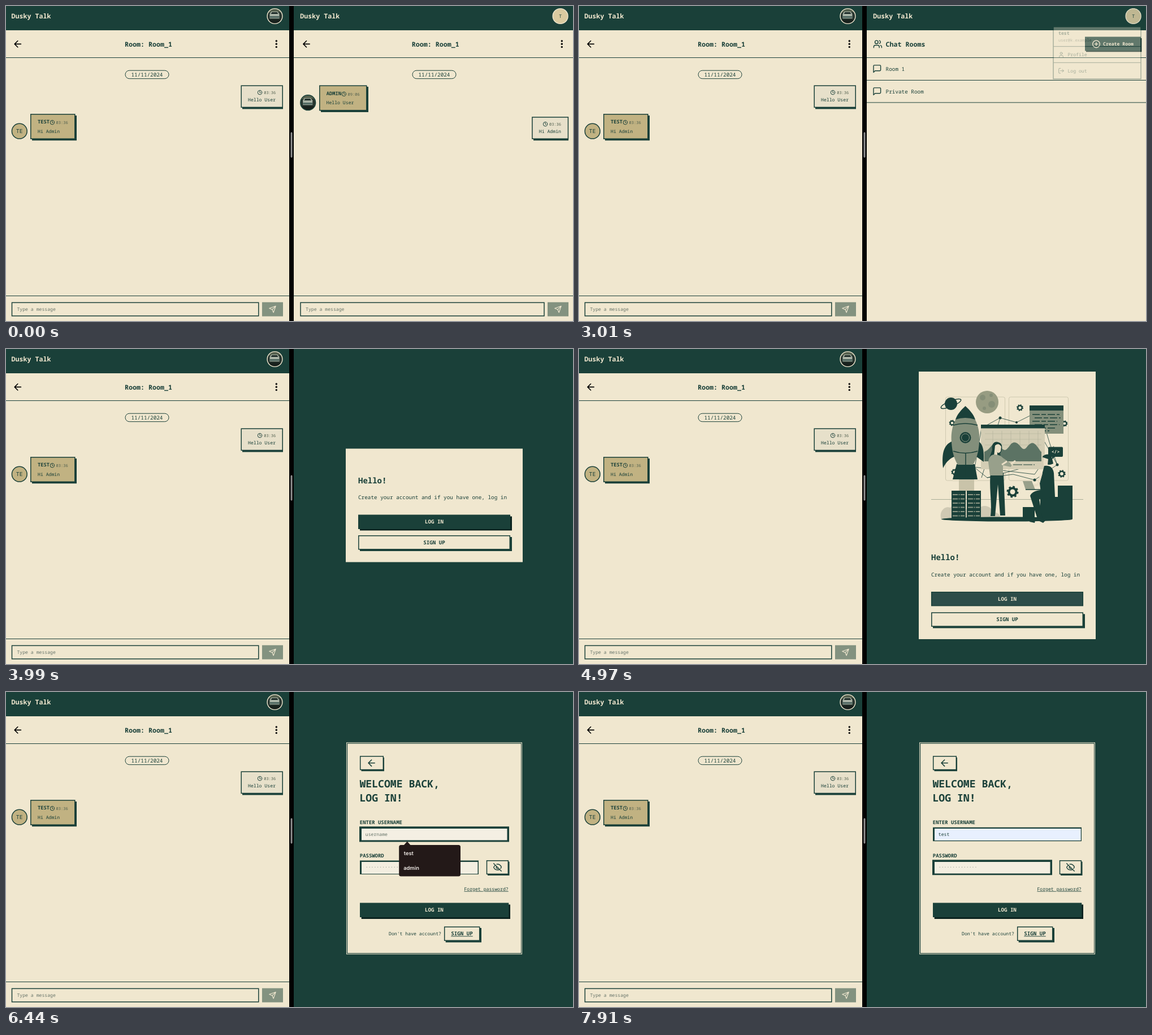
Animation of 1003 by 558 pixels, one loop 8 s. Source, as an HTML page:

```html
<!DOCTYPE html>
<html lang="en">
<head>
<meta charset="utf-8">
<title>Chat demo</title>
<style>
  html, body { margin: 0; width: 100%; height: 100%; overflow: hidden; background: #000; }
  svg { display: block; }
  #stage { width: 100%; height: 100%; --dark: #1a4039; --cream: #f0e7cf; --tan: #c1b282; --deep: #0b231f; --mid: #838f7b; }
  text { font-family: "Noto Sans Mono", "DejaVu Sans Mono", monospace; font-size: 8.17px; fill: var(--dark); text-rendering: geometricPrecision; white-space: pre; }
  .xs { font-size: 7px; fill: #52604f; }
  .md { font-size: 9.33px; }
  .lg { font-size: 11.67px; font-weight: 700; }
  .xl { font-size: 14px; font-weight: 700; }
  .xxl { font-size: 18.17px; font-weight: 700; }
  .name { font-size: 8.75px; font-weight: 700; }
  .label { font-size: 8.95px; font-weight: 600; }
  .btn { font-size: 9.17px; font-weight: 600; }
  .b { font-weight: 600; }
  .c { text-anchor: middle; }
  .light { fill: var(--cream); }
  .hint { fill: #68756a; }
  .u { text-decoration: underline; }
  .tip { font: 600 9.3px Inter, "Liberation Sans", sans-serif; fill: #f3eee9; }
  .dark { fill: var(--dark); }
  .cream { fill: var(--cream); }
  .tan { fill: var(--tan); }
  .mid { fill: var(--mid); }
  .deep { fill: var(--deep); }
  .edge { stroke: var(--dark); stroke-width: 1.5; }
  .line { stroke: var(--dark); stroke-width: 1; fill: none; }
  .icon { fill: none; stroke: var(--dark); stroke-width: 2; stroke-linecap: round; stroke-linejoin: round; }
  .black { stroke: #000; }
  .pale { stroke: var(--cream); }
  [data-on] { opacity: 0; }
</style>
</head>
<body>
<svg id="stage" viewBox="0 0 1003 558" preserveAspectRatio="none">
  <defs>
    <clipPath id="round"><circle r="13"/></clipPath>
    <g id="photo">
      <g clip-path="url(#round)">
        <rect x="-14" y="-14" width="28" height="28" fill="#27352f"/>
        <path d="M-14-14H14V-6L4-8-4-5-14-7Z" fill="#56614f"/>
        <path d="M-9-4 -6-8H5L8-4V4H-9Z" fill="#a9b3a6"/>
        <path d="M-7-4 -5-7H4L6-4Z" fill="#1b2926"/>
        <path d="M-9 0H8V3H-9Z" fill="#4d665f"/>
        <path d="M-14 6H14V14H-14Z" fill="#18211d"/>
      </g>
    </g>
    <g id="back"><path d="M12 19l-7-7 7-7M19 12H5"/></g>
    <g id="dots"><circle r="1.7" cy="-5.3"/><circle r="1.7"/><circle r="1.7" cy="5.3"/></g>
    <g id="clock" class="icon" stroke-width="1"><path style="stroke-width:1" d="M3.7 0A3.7 3.7 0 1 1-3.7 0 3.7 3.7 0 1 1 3.7 0M0-2.2V0L1.5.8"/></g>
    <g id="send">
      <rect width="37" height="25" fill="#839280"/>
      <path class="icon pale" transform="translate(11.6 5.7) scale(.57)" d="M22 2L11 13M22 2l-7 20-4-9-9-4Z"/>
    </g>
    <g id="room"><path class="icon" transform="scale(.7)" d="M21 15a2 2 0 0 1-2 2H7l-4 4V5a2 2 0 0 1 2-2h14a2 2 0 0 1 2 2z"/></g>
    <g id="pill">
      <rect class="line" x=".5" y=".5" width="77" height="14.5" rx="7.25"/>
      <text class="md c" x="39" y="11.2">11/11/2024</text>
    </g>
    <g id="gear" fill="none" stroke="#1a4039">
      <circle r="6.5" stroke-width="4"/>
      <circle r="9" stroke-width="3" stroke-dasharray="3.5 3.57"/>
    </g>
    <g id="rack">
      <rect class="dark" width="25" height="50"/>
      <path d="M2 7H23M2 14.5H23M2 22H23M2 29.5H23M2 37H23M2 44.5H23" stroke="#8a9583" stroke-width="2" stroke-dasharray="9 1.5 2 1.5"/>
    </g>
    <g id="pressed">
      <rect class="cream" width="272" height="29"/>
      <rect x=".7" y=".7" width="267.6" height="24" class="edge" fill="#2d4d49"/>
    </g>
  </defs>

  <!-- left window -->
  <rect class="cream" width="501" height="558"/>
  <rect class="dark" width="501" height="43"/>
  <text class="lg light" x="9.6" y="22.4">Dusky Talk</text>
  <use href="#photo" x="475.5" y="18"/>
  <circle cx="475.5" cy="18" r="13.4" fill="none" stroke="#f0e7cf" stroke-width="1.4"/>
  <use href="#back" class="icon black" transform="translate(11.2 57.8) scale(.8)"/>
  <text class="lg" x="210" y="71.6">Room: Room_1</text>
  <use href="#dots" x="478.3" y="67.3"/>
  <path class="line" d="M0 91.5H501M0 513.5H501"/>
  <use href="#pill" x="210.5" y="113.7"/>
  <path class="dark" d="M418 143H490V182.5H418Z"/>
  <rect class="edge" x="416.2" y="141.2" width="73" height="38.2" fill="#e7e0ca"/>
  <use href="#clock" x="449" y="153.2"/>
  <text class="xs" x="456.2" y="156">03:36</text>
  <text x="428" y="168.8">Hello User</text>
  <circle class="edge tan" cx="23.8" cy="221.7" r="13.4"/>
  <text class="c" style="font-size:9.8px" x="23.7" y="225.2">TE</text>
  <path class="dark" d="M46 194H125V238.3H46Z"/>
  <rect class="edge tan" x="43.8" y="191.8" width="78" height="43.4"/>
  <text class="name" x="56" y="208.4">TEST</text>
  <use href="#clock" x="81.8" y="206.2"/>
  <text class="xs" x="88.6" y="209">03:36</text>
  <text x="56" y="224.8">Hi Admin</text>
  <rect class="edge" x="10.5" y="525.4" width="436.3" height="23.6" fill="none"/>
  <text class="hint" x="19.4" y="540.4">Type a message</text>
  <use href="#send" x="453" y="524.7"/>

  <!-- divider -->
  <rect x="501" width="8" height="558"/>
  <rect x="503.5" y="223.5" width="3" height="45" rx="1.5" fill="#8e8e8e"/>

  <!-- right window: room -->
  <rect class="cream" x="509" width="494" height="558"/>
  <rect class="dark" x="509" width="494" height="43"/>
  <text class="lg light" x="520.2" y="22.4">Dusky Talk</text>
  <circle cx="980.6" cy="18" r="13.4" fill="#d9caa0" stroke="#f0e7cf" stroke-width="1.4"/>
  <text class="c" x="980.6" y="21">T</text>
  <use href="#back" class="icon black" transform="translate(521.9 57.8) scale(.8)"/>
  <use href="#back" class="icon" transform="translate(521.9 57.8) scale(.8)" data-on="840 1890 210"/>
  <text class="lg" x="717.8" y="71.6">Room: Room_1</text>
  <use href="#dots" x="983.3" y="67.3"/>
  <path class="line" d="M509 91.5H1003M509 513.5H1003"/>
  <use href="#pill" x="718.5" y="113.7"/>
  <use href="#photo" x="534.2" y="171.2"/>
  <circle class="edge" cx="534.2" cy="171.2" r="13.4" fill="none"/>
  <path class="dark" d="M557 143H641V188H557Z"/>
  <rect class="edge tan" x="554.8" y="141.2" width="83" height="43.6"/>
  <text class="name" x="566.8" y="158">ADMIN</text>
  <use href="#clock" x="597.8" y="155.9"/>
  <text class="xs" x="604.6" y="158.8">09:06</text>
  <text x="566.5" y="174.4">Hello User</text>
  <path class="dark" d="M933 199H995V238.3H933Z"/>
  <rect class="edge" x="930.9" y="197" width="63.5" height="38.2" fill="#e7e0ca"/>
  <use href="#clock" x="954" y="209.2"/>
  <text class="xs" x="961" y="212">03:36</text>
  <text x="942.8" y="224.8">Hi Admin</text>
  <rect class="edge" x="521" y="525.4" width="431" height="23.6" fill="none"/>
  <text class="hint" x="530" y="540.4">Type a message</text>
  <use href="#send" x="958" y="524.7"/>

  <!-- right window: room list -->
  <g data-on="1890 3990">
    <rect class="cream" x="509" y="43" width="494" height="515"/>
    <path class="line" d="M509 91.5H1003M509 131.5H1003M509 171H1003"/>
    <g class="icon" transform="translate(520 59) scale(.7)">
      <path d="M16 21v-2a4 4 0 0 0-4-4H6a4 4 0 0 0-4 4v2M22 21v-2a4 4 0 0 0-3-3.87M16 3.13a4 4 0 0 1 0 7.75"/>
      <circle cx="9" cy="7" r="4"/>
    </g>
    <text class="lg" x="542.5" y="71.6">Chat Rooms</text>
    <path class="deep" d="M897 57H995.3V81.3H897Z"/>
    <rect class="dark" x="895" y="54.5" width="98.7" height="25"/>
    <g class="icon pale" transform="translate(906.6 59) scale(.7)">
      <path d="M12 8v8M8 12h8"/><circle cx="12" cy="12" r="9"/>
    </g>
    <text class="b light" x="927" y="70.4">Create Room</text>
    <use href="#room" x="518.9" y="102.8"/>
    <text class="md" x="542.6" y="114.7">Room 1</text>
    <use href="#room" x="518.9" y="142.8"/>
    <text class="md" x="542.6" y="154.7">Private Room</text>
  </g>
  <path d="M533 68.5V78.6L535.2 76.6 536.9 80.4 538.6 79.7 537 76H540Z" stroke="#fff" stroke-width=".5" data-on="1890 2240"/>
  <g data-on="2730 3150 210 210"><circle class="dark" cx="980.6" cy="18" r="13.4" opacity=".2"/></g>
  <g data-on="3010 3990 210">
    <rect class="edge cream" x="839" y="36.8" width="155" height="92.4"/>
    <path class="line" d="M839 71.7H994M839 100.3H994"/>
    <path d="M841.5 75H991.5V98H841.5Z" fill="#f3f1f1" data-on="3500 3710 140 140"/>
    <path d="M841.5 103.3H991.5V126.6H841.5Z" fill="#f3f1f1" data-on="3640 3990 210"/>
    <text class="b" x="848" y="51.4">test</text>
    <text class="xs hint" x="848" y="62.8">user@k.example</text>
    <g class="icon" transform="translate(847.3 80.5) scale(.48)">
      <path d="M19 21v-2a4 4 0 0 0-4-4H9a4 4 0 0 0-4 4v2"/><circle cx="12" cy="7" r="4"/>
    </g>
    <text x="864.4" y="89.2">Profile</text>
    <path class="icon" transform="translate(847.3 109) scale(.48)" d="M9 21H5a2 2 0 0 1-2-2V5a2 2 0 0 1 2-2h4M16 17l5-5-5-5M21 12H9"/>
    <text x="864.4" y="117.8">Log out</text>
  </g>

  <!-- right window: welcome -->
  <rect class="dark" x="509" width="494" height="558" data-on="3990 8000"/>
  <path class="cream" d="M601 176.5H914V377.5H601Z" data-on="3990 4060"/>
  <g data-on="4060 5250">
    <path class="cream" d="M601 40H914V514H601Z"/>
    <g fill="none" stroke="#cfc9b0">
      <rect x="648.5" y="85" width="105" height="148" rx="3"/>
      <rect x="760.5" y="85" width="105" height="148" rx="3"/>
      <path d="M623 266.5H892" stroke="#a9ae98"/>
    </g>
    <g fill="none" stroke="#1a4039" stroke-width=".8">
      <path d="M712 140L745 122 774 130 798 118 824 138 832 165 846 205 806 232 768 222 722 228 700 210 712 140M690 208L806 222 840 172M745 122L712 228M798 118L846 205M722 228L824 200"/>
    </g>
    <g class="dark">
      <circle cx="658" cy="97" r="11"/><circle cx="745" cy="122" r="2.5"/><circle cx="774" cy="130" r="2"/><circle cx="846" cy="205" r="2.5"/><circle cx="806" cy="232" r="2.5"/>
    </g>
    <ellipse cx="658" cy="97" rx="19" ry="5" transform="rotate(-22 658 97)" class="edge" fill="none"/>
    <circle cx="722" cy="94" r="20" fill="#979c82"/>
    <g fill="#858e77"><circle cx="714" cy="86" r="5"/><circle cx="730" cy="98" r="6"/><circle cx="717" cy="105" r="3"/><circle cx="729" cy="82" r="3"/></g>
    <use href="#gear" transform="translate(780 104) scale(.57)"/>
    <use href="#gear" transform="translate(660 131) scale(.52)"/>
    <use href="#gear" transform="translate(664 218) scale(.55)"/>
    <use href="#gear" transform="translate(854 221) scale(.65)"/>
    <use href="#gear" transform="translate(859 132) scale(.52)"/>
    <use href="#gear" transform="translate(767 253)"/>
    <!-- windows -->
    <path class="mid" d="M797 100H857V150H797Z"/>
    <path class="dark" d="M797 100H857V109H797Z"/>
    <path d="M802 116H850M806 122H852M802 128H846M806 134H850M802 140H842M802 145H832" class="edge" stroke-dasharray="13 3 8 3"/>
    <path d="M711 139H824V213H711Z" fill="#d3cdb4"/>
    <path class="dark" d="M711 134H824V140.5H711Z"/>
    <path d="M718 150H818M718 160H818M718 170H818M718 180H818M732 145V200M748 145V200M764 145V200M780 145V200M796 145V200M812 145V200" stroke="#b7b69f" stroke-width=".7"/>
    <path d="M717 199V182C726 180 730 166 738 168S750 184 757 177 765 164 773 166 784 184 792 174 804 165 810 172 815 181 818 182V199Z" fill="#5c7364"/>
    <path d="M768 205H806" stroke="#1a4039" stroke-dasharray="16 2"/>
    <path class="dark" d="M832 173.5H854Q856 173.5 856 175.5V189Q856 191 854 191H842L837 195V191H832Q830 191 830 189V175.5Q830 173.5 832 173.5Z"/>
    <text class="b light c" x="843" y="185.3">&lt;/&gt;</text>
    <!-- rocket -->
    <path d="M672 228H699V252H672Z" fill="#c9c3a9"/>
    <path class="dark" d="M661 163C646 169 641 183 644 211 650 199 657 193 666 190ZM706 163C714 168 717 178 716 200L702 190ZM668 204H700L705 231H661Z"/>
    <path class="mid" d="M683.5 102C665 120 657 140 659 165 660 184 665 197 670 205H697C702 197 707 184 708 165 710 140 702 120 683.5 102Z"/>
    <path class="dark" d="M683.5 101C675 109 669 116 666 125Q683 119 701 125C698 116 692 109 683.5 101Z"/>
    <path class="edge" fill="none" d="M662 135Q683 129 705 135M662 181Q683 188 705 181M684 185V224"/>
    <circle class="dark" cx="683.5" cy="157" r="10"/>
    <circle cx="683.5" cy="157" r="7" fill="none" stroke="#8a9583"/>
    <!-- ground -->
    <path d="M641 302C636 289 646 277 657 281 667 270 677 276 679 283H706C717 273 731 280 731 289 742 288 746 295 745 302Z" fill="#cfc9b3"/>
    <use href="#rack" x="659" y="251"/>
    <use href="#rack" x="686" y="251"/>
    <ellipse class="dark" cx="757" cy="301.5" rx="116" ry="4"/>
    <path class="dark" d="M847 242H873V301H847ZM816 262H848V301H816ZM785 280H806V301H785Z"/>
    <!-- people -->
    <path class="dark" d="M731 178C729 166 737 162 744 166 751 169 748 181 745 185 748 194 735 204 728 199 723 195 729 187 731 178ZM728 219H751L754 295H745L741 240 736 296H728C731 273 725 246 728 219Z"/>
    <path d="M736 171Q742 165 747 173L746 181Q743 186 740 183V190H734Z" fill="#e9dec5"/>
    <path d="M733 187Q744 186 750 193L766 204 764 209 750 206V224H727L724 200Q725 189 733 187Z" fill="#98a08b"/>
    <path d="M764 204L772 198M748 205L757 199" stroke="#e9dec5" stroke-width="3"/>
    <path class="dark" d="M820 190Q828 183 836 190L839 203Q830 208 823 201ZM823 207Q838 205 840 220L842 262H818L815 238ZM838 246L842 263 814 266 820 301H811L798 260Q802 251 816 250ZM816 297 826 303 821 308 810 303ZM798 300H808L806 308 797 306Z"/>
    <path d="M821 192 830 195 829 205 822 207Z" fill="#e9dec5"/>
    <path d="M818 220 812 240 802 243" fill="none" stroke="#e9dec5" stroke-width="4"/>
    <path d="M785 234H801L807 249H790Z" fill="#98a08b"/>
    <path d="M790 249H820" class="edge"/>
  </g>
  <g data-on="3990 5250">
    <g id="intro">
      <text class="xl" x="623" y="374.3">Hello!</text>
      <text class="md" x="623" y="402.6">Create your account and if you have one, log in</text>
      <path class="deep" d="M626 433H895V458H626Z"/>
      <path class="dark" d="M623 430H892V455.3H623Z"/>
      <use href="#pressed" x="623" y="430" data-on="4900 5250 140"/>
      <text class="btn light c" x="757.5" y="445.9">LOG IN</text>
      <path class="dark" d="M626 469.5H895V494.5H626Z"/>
      <rect class="edge cream" x="623.8" y="467.2" width="267.5" height="24"/>
      <text class="btn c" x="757.5" y="482.2">SIGN UP</text>
    </g>
  </g>

  <!-- right window: log in -->
  <g data-on="5250 8000">
    <rect x="602.5" y="89.8" width="310" height="374.4" fill="none" stroke="#f0e7cf"/>
    <path class="cream" d="M604.2 91.5H911V462.5H604.2Z"/>
    <path class="dark" d="M628.5 116H669V140.3H628.5Z"/>
    <rect class="edge cream" x="626.7" y="114" width="40.6" height="23.6"/>
    <use href="#back" class="icon" transform="translate(637 116.2) scale(.8)"/>
    <text class="xxl" x="625.4" y="169">WELCOME BACK,</text>
    <text class="xxl" x="625.4" y="194.4">LOG IN!</text>
    <text class="label" x="625.8" y="234.4">ENTER USERNAME</text>
    <path class="dark" d="M626 239.7H889V264.3H626Z"/>
    <path d="M629 242H887.5V263H629Z" fill="#f4efe3"/>
    <path d="M629 242H887.5V263H629Z" fill="#e8f0fe" data-on="6510 8000 210"/>
    <path class="dark" fill-rule="evenodd" d="M625 238.2H890V265.5H625ZM628 240.6V262.5H886.5V240.6Z" data-on="5880 7560 280 280"/>
    <text class="hint" x="635.8" y="255" data-on="5250 6580">username</text>
    <text x="635.8" y="255" data-on="6580 8000">test</text>
    <text class="label" x="625.8" y="292.8">PASSWORD</text>
    <path class="dark" d="M626 298.4H836V323H626Z"/>
    <path d="M629 301H834.5V322H629Z" fill="#f3eee0"/>
    <path class="dark" fill-rule="evenodd" d="M625 297.2H837V324.2H625ZM628 299.6V321.4H833.5V299.6Z" data-on="7350 8000 280"/>
    <text class="hint" x="635.8" y="313.4">··············</text>
    <path d="M636.2 305.2V316" class="line" data-on="7420 7910"/>
    <path class="dark" d="M852 300.5H890.5V325H852Z"/>
    <rect class="edge cream" x="850.5" y="298.8" width="37.8" height="23.6"/>
    <path class="icon" transform="translate(861.3 302.3) scale(.68)" d="M9.9 4.2A10 10 0 0 1 22 12a17 17 0 0 1-2.2 3.2M6.6 6.6A13.5 13.5 0 0 0 2 12s3 7 10 7a9.7 9.7 0 0 0 5.4-1.6M14.1 14.1a3 3 0 1 1-4.2-4.2M2 2L22 22"/>
    <text class="u" x="810.4" y="351.8">Forget password?</text>
    <path class="deep" d="M628.7 376.5H892V402H628.7Z"/>
    <path class="dark" d="M626 373.6H889.3V399H626Z"/>
    <g data-on="5250 5530 0 210">
      <path class="cream" d="M626 373H893V403H626Z"/>
      <rect class="edge" x="626.7" y="374.4" width="262" height="24" fill="#2d4d49"/>
    </g>
    <text class="btn light c" x="757.4" y="389.3">LOG IN</text>
    <text x="677" y="431.2">Don't have account?</text>
    <path class="dark" d="M777.7 418H841V443.4H777.7Z"/>
    <rect class="edge cream" x="775.7" y="416.2" width="62" height="24"/>
    <text class="btn c u" x="806.5" y="431.3">SIGN UP</text>
    <g data-on="5880 7000 280 140">
      <path d="M704 271L709.7 264.8 715.4 271H800.5Q804 271 804 274.5V323Q804 326.5 800.5 326.5H698.7Q695.2 326.5 695.2 323V274.5Q695.2 271 698.7 271Z" fill="#231918"/>
      <rect x="698" y="275" width="103.5" height="23" rx="3" fill="#433a39" data-on="6510 7000 140"/>
      <text class="tip" x="703.7" y="289.4">test</text>
      <text class="tip" x="703.2" y="314.6">admin</text>
    </g>
  </g>
</svg>
<script>
  const LOOP = 8000, TICK = 70;
  // data-on: start, end, fade-in and fade-out lengths in ms
  const parts = [...document.querySelectorAll('[data-on]')].map(el => {
    const [from, to, fadeIn = 0, fadeOut = 0] = el.dataset.on.split(' ').map(Number);
    return { el, from, to, fadeIn, fadeOut };
  });
  // the first picture of the welcome page sits higher, before its art loads
  const intro = document.getElementById('intro');
  const begin = performance.now();

  function level(p, t) {
    if (t < p.from || t >= p.to) return 0;
    const rise = p.fadeIn ? (t - p.from + TICK) / p.fadeIn : 1;
    const fall = p.fadeOut ? (p.to - t) / p.fadeOut : 1;
    return Math.min(1, rise, fall);
  }

  function draw() {
    const t = Math.floor((performance.now() - begin) % LOOP / TICK) * TICK;
    for (const p of parts) p.el.style.opacity = level(p, t);
    intro.setAttribute('transform', `translate(0 ${t < 4060 ? -136.4 : 0})`);
    requestAnimationFrame(draw);
  }
  draw();
</script>
</body>
</html>
```
